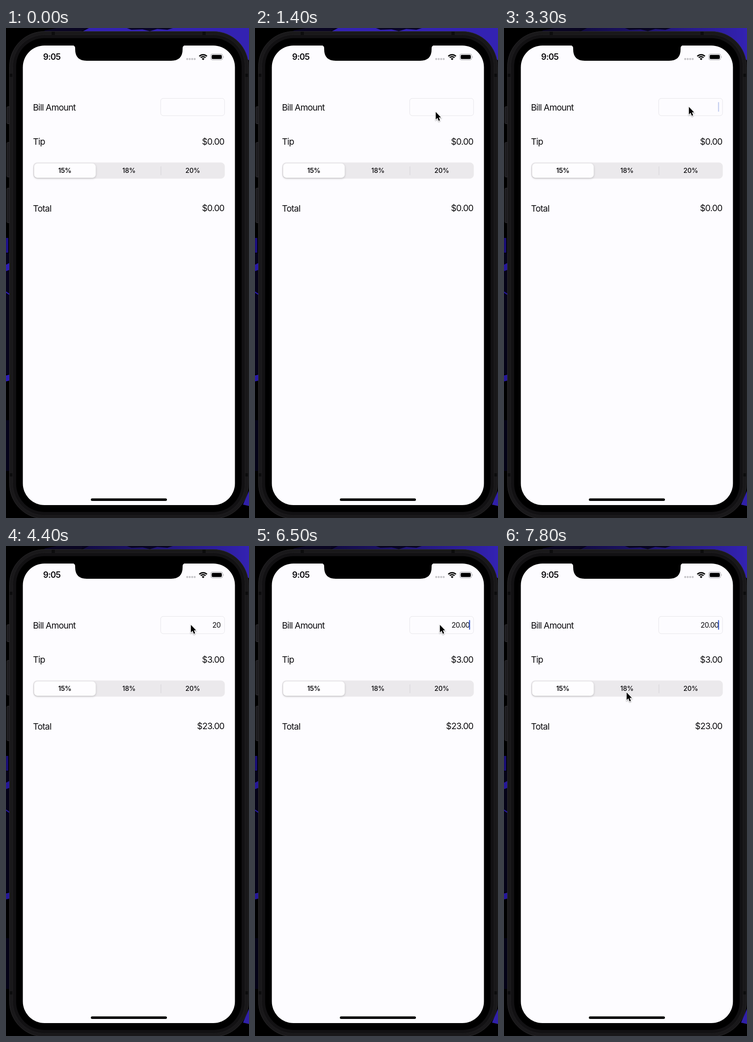
These frames come from a looping animation (527x1062 px, 8000 ms). An HTML page:

```html
<!DOCTYPE html>
<html lang="en">
<head>
<meta charset="utf-8">
<title>Tip calculator</title>
<style>
  html, body { margin: 0; width: 100%; height: 100%; overflow: hidden; background: #000; }
  svg { display: block; width: 527px; height: 1062px; }
  text { font: 18.9px Inter, "Liberation Sans", sans-serif; letter-spacing: -.04em; fill: #0b0a0d; }
  .end { text-anchor: end; }
  .seg text { font-size: 14.4px; font-weight: 500; letter-spacing: -.015em; text-anchor: middle; }
  .seg text.on, #clock { font-weight: 600; }
  #clock { font-size: 18.2px; }
  #bill { font-size: 15.5px; }
</style>
</head>
<body>
<svg viewBox="0 0 527 1062">
  <defs>
    <linearGradient id="fade">
      <stop offset="0" stop-color="#06031c" stop-opacity=".75"/>
      <stop offset="1" stop-color="#06031c" stop-opacity="0"/>
    </linearGradient>
    <filter id="lift" x="-20%" y="-30%" width="140%" height="180%">
      <feDropShadow dx="0" dy="1.5" stdDeviation="2" flood-opacity=".22"/>
    </filter>
    <filter id="soft" x="-60%" y="-40%" width="240%" height="200%">
      <feDropShadow dx="0" dy="1.5" stdDeviation="1.3" flood-opacity=".4"/>
    </filter>
  </defs>

  <!-- wallpaper -->
  <rect width="527" height="1062"/>
  <path d="M85 5L110 0H180L160 8H80Z" fill="#0a0622"/>
  <path d="M180 0H527V70L440 8H165Z" fill="#3322b2"/>
  <path d="M262 0H362L350 4L328 2L312 7L296 3L272 4Z" fill="#0a0628"/>
  <rect id="dim" x="165" width="362" height="70" fill="url(#fade)"/>
  <g id="leftGlow" fill="#2c1cb4">
    <path d="M0 488H8V750H0Z" fill="#07041c"/>
    <path d="M0 455H5V487H0Z" fill="#1d1088"/>
    <path d="M0 513L8 509V524L0 527Z"/>
    <path d="M0 571L8 576V579L0 574Z"/>
    <path d="M0 753L8 751V764L0 766Z"/>
    <path d="M0 850H8V960H0Z" fill="#05031a"/>
  </g>
  <path d="M527 1003V1036L514 1033Z" fill="#3020a8"/>

  <!-- phone -->
  <g fill="#1d1c1f" stroke="#343336">
    <rect x="2" y="170.500" width="8" height="37" rx="2"/>
    <rect x="2" y="248" width="8" height="75" rx="2"/>
    <rect x="2" y="347" width="8" height="75" rx="2"/>
  </g>
  <rect x="7.500" y="7.500" width="518.500" height="1056" rx="76" fill="#19181a" stroke="#2b2a2c"/>
  <rect x="14.500" y="14.500" width="504" height="1042" rx="69" fill="#121113" stroke="#1f1e20"/>
  <path d="M99 8h7v7h-7zM426 8h7v7h-7zM8 99h6v7h-6zM8 965h6v7h-6zM519 99h6v7h-6zM519 965h6v7h-6z" fill="#0c0c0d"/>
  <rect x="22" y="22" width="489" height="1027" rx="61"/>
  <rect x="36.500" y="38" width="460" height="996" rx="47" fill="#fdfcff"/>
  <path d="M144 37.500Q150 38 150 44V46Q150 71 175 71H358Q383 71 383 46V44Q383 38 389 37.500Z"/>
  <rect x="184" y="1019.500" width="165" height="5.500" rx="2.750"/>

  <!-- status bar -->
  <text id="clock" x="80.500" y="69.300">9:05</text>
  <path d="M393 67.300h.01M398.400 67.300h.01M403.800 67.300h.01M409.200 67.300h.01" stroke="#c5c4c8" stroke-width="4.400" stroke-linecap="round"/>
  <path d="M419.200 61.200a11.800 11.800 0 0 1 16.600 0M422.300 64.300a7.300 7.300 0 0 1 10.400 0" fill="none" stroke="#000" stroke-width="2.700"/>
  <path d="M427.500 69.700l-2.900-2.900a4.100 4.100 0 0 1 5.800 0z"/>
  <rect x="444" y="56.200" width="26" height="13" rx="3.800" fill="none" stroke="#a3a2a6"/>
  <rect x="446" y="58.200" width="22" height="9" rx="2.300"/>
  <path d="M471.500 60.500q1.800 2.200 0 4.400z" fill="#a3a2a6"/>

  <!-- form -->
  <text x="58.500" y="178.500">Bill Amount</text>
  <text x="58.500" y="253">Tip</text>
  <text x="58.500" y="397.500">Total</text>
  <rect x="335.500" y="152.500" width="138.500" height="37.500" rx="5.500" fill="none" stroke="#e6e5e9"/>
  <text id="bill" class="end" x="465.500" y="176.700"></text>
  <rect id="caret" x="464.200" y="160.500" width="2.200" height="21" rx="1.100" fill="#3558c8"/>
  <text id="tip" class="end" x="473.500" y="253"></text>
  <text id="total" class="end" x="473.500" y="396.700"></text>
  <g class="seg">
    <rect x="59" y="291.500" width="415.500" height="35" rx="8.500" fill="#ebe9ec"/>
    <rect x="61" y="293.500" width="133.500" height="31" rx="7.500" fill="#fefdff" filter="url(#lift)"/>
    <path d="M336 300V319" stroke="#d3d1d6"/>
    <text class="on" x="127.500" y="314.300">15%</text>
    <text x="266.500" y="314.300">18%</text>
    <text x="405" y="314.300">20%</text>
  </g>

  <path id="pointer" d="M0 0V16.200L3.700 12.800L6.400 19.200L9.100 18L6.500 11.800H11.300Z" stroke="#fff" stroke-width="2" paint-order="stroke" filter="url(#soft)"/>
</svg>
<script>
  const LOOP = 8000, STEP = 100, TIP_RATE = .15;
  const el = id => document.getElementById(id);
  const clamp = v => Math.min(1, Math.max(0, v));
  const ramp = (t, from, to) => clamp((t - from) / (to - from));

  // [time, field text, start of the blink cycle]
  const keys = [
    [2900, '', 2900], [3800, '2', 3800], [3900, '20', 3900],
    [4600, '20.', 4600], [4900, '20.0', 4900], [5400, '20.00', 5600]
  ];
  // [time, x, y] of the pointer tip
  const path = [
    [400, 257, 474], [500, 283, 403], [800, 283, 403], [1400, 392, 182],
    [1900, 397, 175], [2400, 401, 171], [6900, 401, 171], [7700, 266, 317.500], [8000, 266, 317.500]
  ];

  function pointerAt(t) {
    const i = Math.max(1, path.findIndex(p => p[0] > t));
    const [t0, x0, y0] = path[i - 1], [t1, x1, y1] = path[i];
    const u = ramp(t, t0, t1), e = u * u * (3 - 2 * u);
    return [x0 + (x1 - x0) * e, y0 + (y1 - y0) * e];
  }

  function caretAlpha(age) {
    const phase = age % 1000;
    if (phase < 400 || phase >= 900) return 1;
    return phase < 500 || phase >= 800 ? .3 : 0;
  }

  const money = v => '$' + v.toFixed(2);

  function draw(t) {
    const key = keys.filter(k => k[0] <= t).pop();
    const text = key ? key[1] : '';
    const bill = +text || 0;
    el('bill').textContent = text;
    el('tip').textContent = money(bill * TIP_RATE);
    el('total').textContent = money(bill * (1 + TIP_RATE));
    el('caret').style.opacity = key ? caretAlpha(t - key[2]) : 0;

    el('pointer').style.display = t < path[0][0] ? 'none' : '';
    el('pointer').setAttribute('transform', `translate(${pointerAt(t)})`);
    el('dim').style.opacity = ramp(t, 1400, 1900);
    el('leftGlow').style.opacity = 1 - .15 * ramp(t, 800, 1900);
  }

  function tick(now) {
    draw(Math.floor(now % LOOP / STEP) * STEP);
    requestAnimationFrame(tick);
  }
  draw(0);
  requestAnimationFrame(tick);
</script>
</body>
</html>
```
